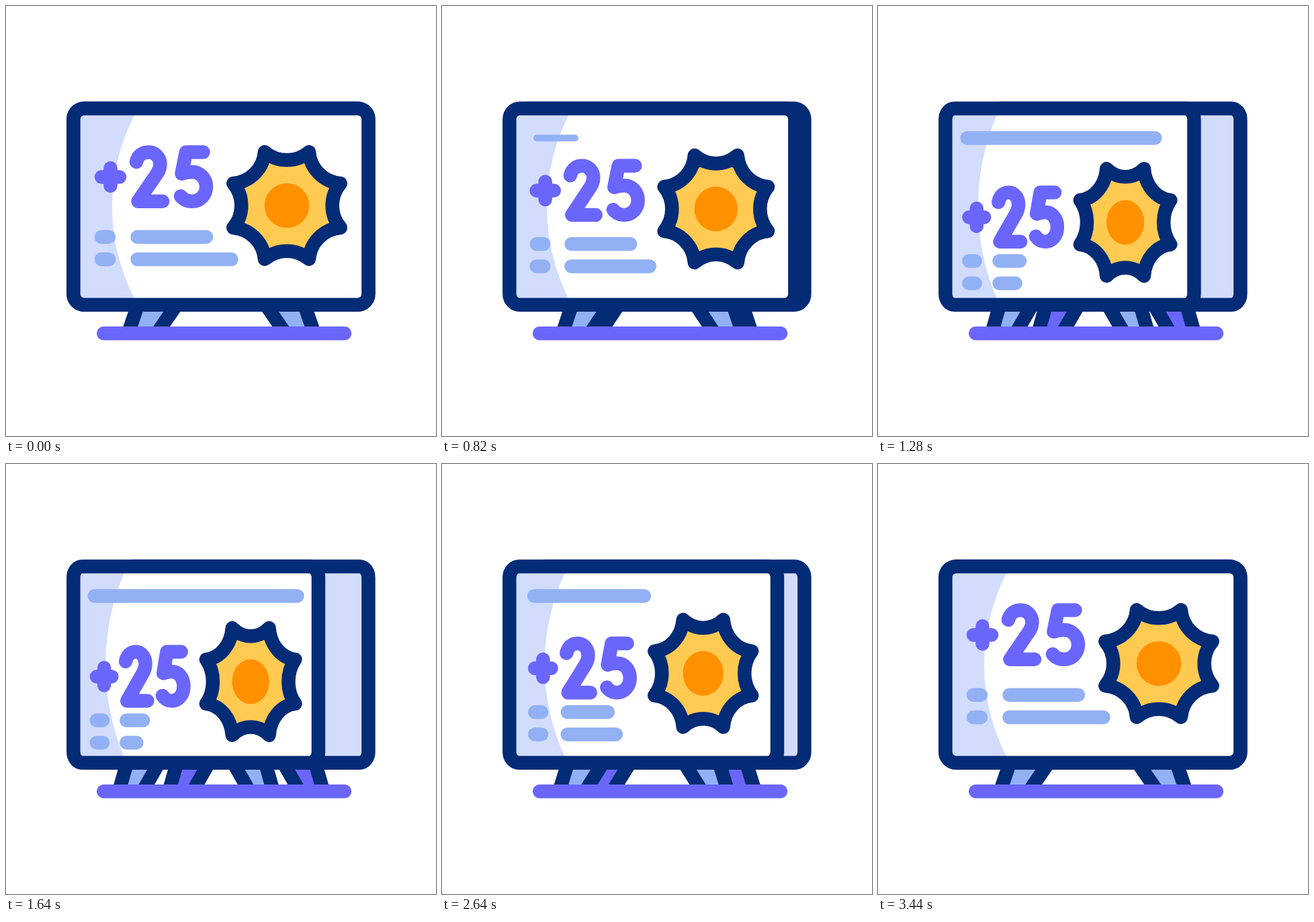
Animation of 640 by 640 pixels, one loop 3600 ms. Source, as an HTML page:

```html
<!DOCTYPE html>
<html lang="en">
<head>
<meta charset="utf-8">
<title>Forecast screen</title>
<style>
  @property --fold { syntax: "<number>"; inherits: true; initial-value: 0; }
  @property --drop { syntax: "<number>"; inherits: true; initial-value: 0; }

  html, body { margin: 0; width: 100%; height: 100%; overflow: hidden; background: #fff; }

  svg {
    --navy: #042b75;
    --violet: #6b66fb;
    --blue: #92b1f4;
    --pale: #d2dcfd;
    --squash: calc(1 - .17 * var(--fold));
    --early: min(1, 1.15 * var(--drop));
    display: block;
    width: 640px;
    height: 640px;
    animation: fold 3.6s infinite, drop 3.6s infinite;
  }

  @keyframes fold {
    0%, 2.5% { --fold: 0; animation-timing-function: cubic-bezier(.87, 0, .2, 1); }
    49.44% { --fold: 1; animation-timing-function: cubic-bezier(.83, 0, .2, 1); }
    96.94%, 100% { --fold: 0; }
  }
  @keyframes drop {
    0%, 16.67% { --drop: 0; animation-timing-function: ease-in-out; }
    30%, 72.78% { --drop: 1; animation-timing-function: ease-in-out; }
    86.1%, 100% { --drop: 0; }
  }

  /* outlines keep their weight while the panels squash */
  path, rect, line {
    vector-effect: non-scaling-stroke;
    stroke-width: 20.5px;
    stroke-linejoin: round;
  }
  .front, .back { transform: scaleX(var(--squash)); }
  .front { transform-origin: 100px 0; }
  .back { transform-origin: 539.5px 0; }

  .frame, .leg { stroke: var(--navy); }
  .leg { stroke-linejoin: miter; }
  .front .frame { fill: none; }
  .front .leg { fill: var(--blue); }
  .back .frame { fill: var(--pale); }
  .back .leg { fill: var(--violet); }

  .digits, .bar { fill: none; stroke-linecap: round; }
  .digits { stroke: var(--violet); transform: translateY(calc(27px * var(--fold) + 35px * var(--drop))); }
  .bar { stroke: var(--blue); }
  .rows { transform: translateY(calc(27px * var(--fold) + 10.8px * var(--early))); }
  .long { --x: calc(195.5px - 16.2px * var(--fold)); }
  .one { transform: translate(var(--x), 343.8px) scaleX(calc(102.5 - 78 * var(--fold))); }
  .two { transform: translate(var(--x), 377px) scaleX(calc(140 - 125.5 * var(--fold))); }
  .title {
    stroke-width: calc(20.5px * var(--early));
    transform: translate(calc(143.3px - 11.6px * var(--fold)), 196.5px) scaleX(calc(303 * var(--fold)));
  }
  .sun { transform: translate(418px, calc(297px + 27px * var(--fold))); }
</style>
</head>
<body>
<svg viewBox="0 0 640 640" role="img" aria-label="Screen showing +25 and a sun">
  <defs>
    <g id="legs">
      <path class="leg" d="M182.3 486L198 440H257L225.4 486"/>
      <path class="leg" d="M458.2 486L442.5 440H383.5L415.1 486"/>
    </g>
  </defs>

  <g class="back">
    <path class="leg" d="M182.3 486L198 440H257L225.4 486"/>
    <path class="leg" d="M458.2 486L442.5 440H383.5L415.1 486"/>
    <rect class="frame" x="100.4" y="152.4" width="439" height="292.4" rx="16"/>
  </g>

  <g class="front">
    <path class="leg" d="M182.3 486L198 440H257L225.4 486"/>
    <path class="leg" d="M458.2 486L442.5 440H383.5L415.1 486"/>
    <rect x="100.4" y="152.4" width="439" height="292.4" rx="16" fill="#fff"/>
    <path d="M100.4 160H192.5A297 297 0 0 0 192.5 438H100.4Z" fill="var(--pale)"/>
    <rect class="frame" x="100.4" y="152.4" width="439" height="292.4" rx="16"/>

    <g class="digits">
      <path d="M142 254.5H169M155.5 241.3V267.7"/>
      <path d="M194 232C196 223 203 217.5 212 217.5C222 217.5 229.5 225.5 229.5 235.5C229.5 243 226 248 222 253.5L196.5 290.7H233"/>
      <path d="M293.5 217.5H268L261.5 249.5C266 248 271 247 277 247C289 247 298 257 298 269C298 281 289 290.7 277 290.7C270 290.7 264 288 260 283"/>
    </g>

    <g class="rows">
      <line class="bar" x1="142" y1="343.8" x2="153" y2="343.8"/>
      <line class="bar" x1="142" y1="377" x2="153" y2="377"/>
    </g>

    <g class="sun">
      <path fill="#ffca52" stroke="#042b75" d="M-33 -79.8A51 51 0 0 0 33 -79.8A51 51 0 0 0 79.8 -33A51 51 0 0 0 79.8 33A51 51 0 0 0 33 79.8A51 51 0 0 0 -33 79.8A51 51 0 0 0 -79.8 33A51 51 0 0 0 -79.8 -33A51 51 0 0 0 -33 -79.8Z"/>
      <circle r="33.3" fill="#ff9100"/>
    </g>
  </g>

  <g class="rows long">
    <line class="bar one" x2="1"/>
    <line class="bar two" x2="1"/>
  </g>
  <line class="bar title" x2="1"/>
  <line x1="145.2" y1="487.2" x2="504" y2="487.2" stroke="var(--violet)" stroke-linecap="round"/>
</svg>
</body>
</html>
```
